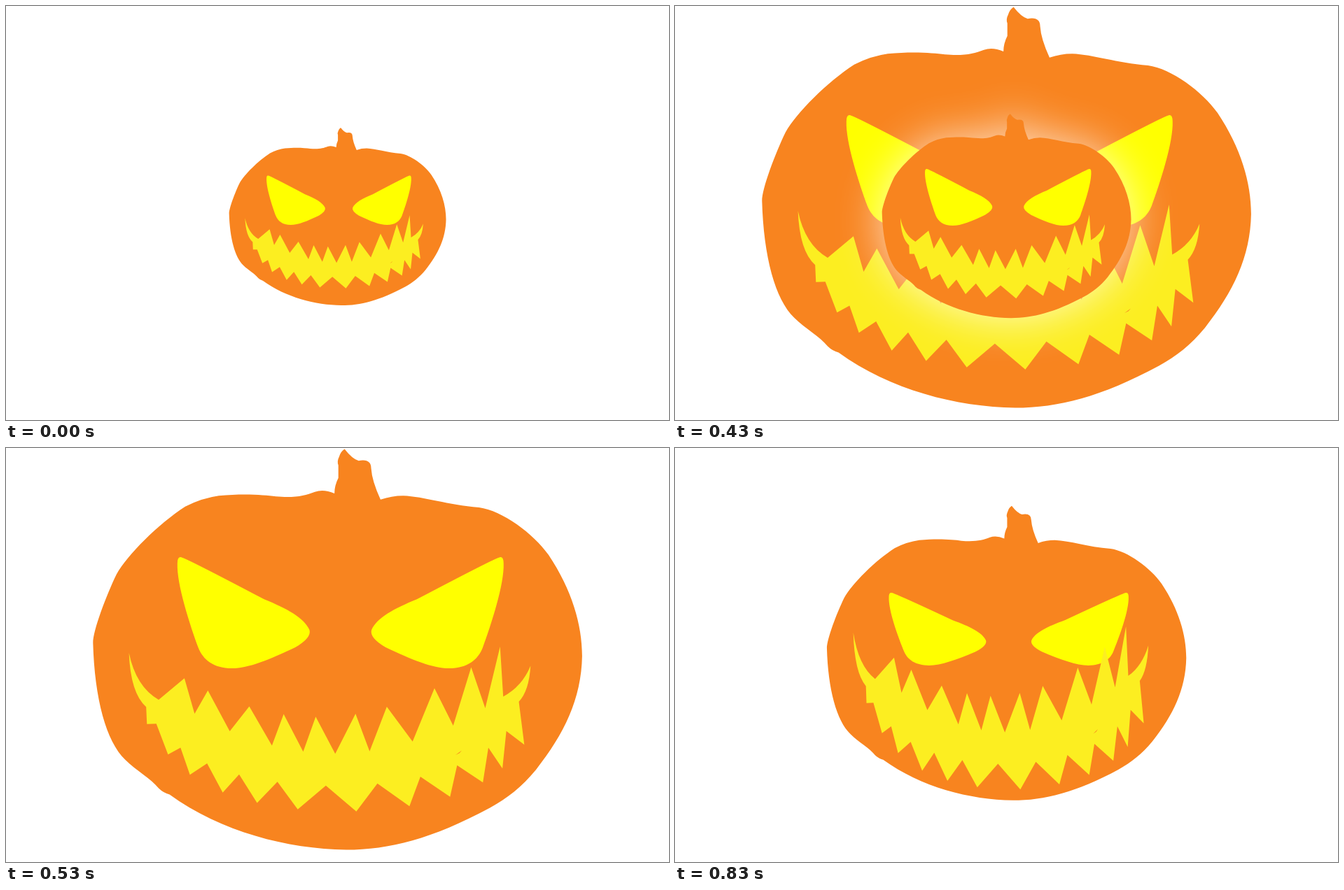
Write an HTML page with a canvas that moves like this. It is 947 by 592 pixels and loops after 900 ms.

```html
<!DOCTYPE html>
<html lang="en">
<head>
<meta charset="utf-8">
<title>Pumpkin</title>
<style>
  html, body { margin: 0; width: 100%; height: 100%; overflow: hidden; background: #fff; }
  canvas { display: block; }
</style>
</head>
<body>
<canvas id="stage" width="947" height="592"></canvas>
<script>
const ctx = document.getElementById('stage').getContext('2d');
const LOOP = 900;
const ORANGE = '#f8841f', YELLOW = '#fcee21', DARK = '#2e0a17', AMBER = '#fbb03b', BRIGHT = '#ffff00';
const MID_X = 479, MID_Y = 286.5, EYE_Y = 285, MOUTH_Y = 388;

// Stem, right side, underside, left side
const body = new Path2D(`M475 86 Q475 76 480 66 V50 Q478 45 481 39 Q483 32 488 29
  Q498 42 506 44 Q522 41 522 54 Q523 70 534 94
  Q548 89 563 89 C590 90 620 101 660 104 C690 108 730 138 749 165 C779 210 792 255 792 295
  C791 350 769 395 733 441 C715 463 696 478 674 490 C600 530 545 544 490 544
  C415 543 330 521 264 473 Q256 471 250 465 C240 452 222 443 207 428
  C183 405 168 350 166 278 C166 262 183 217 196 190 C210 165 250 125 284 103
  Q305 92 327 89 C360 86 385 88 400 90 C425 92 437 89 450 84 Q461 80 475 86Z`);

const eye = new Path2D(`M274 188 Q274 180 279 181 Q285 182 385 229 C415 240 436 250 443 264
  Q446 273 425 284 C392 298 365 308 344 308 C320 308 307 298 301 285 C290 258 273 212 274 188Z`);
const eyes = new Path2D(eye);
eyes.addPath(eye, new DOMMatrix([-1, 0, 0, 1, 965.5, 0]));

// Teeth alternate between tips and gaps; each row follows a sagging curve
const sag = d => .0011 * d ** 2 + 2.7e-13 * d ** 6;
const upperY = (x, i) => i % 2 ? 421 - .0019 * (x - 481) ** 2 : 364 - .002 * (x - 460) ** 2;
const lowerY = (x, i) => i % 2 ? 470 - sag(x - 480) : 510 - sag(x - 490);
const teeth = (xs, rule) => xs.map((x, i) => `L${x} ${rule(x, i)}`).join('');
const upper = [288, 301, 318, 346, 371, 400, 415, 440, 456, 481, 507, 525, 547, 580, 608, 632, 655, 673, 692, 696];
const lower = [723, 700, 695, 677, 670, 637, 628, 590, 576, 535, 508, 469, 433, 407, 381, 358, 337, 317, 295, 283, 267, 252, 240];
const mouth = new Path2D(`M217 266 Q226 318 255 338 ${teeth(upper, upperY)}
  Q720 318 731 286 Q729 325 716 341 ${teeth(lower, lowerY)} L239 349 Q219 328 217 266Z
  M635 423 L643 416 640 420Z`);

function fill(path, color) {
  ctx.fillStyle = color;
  ctx.fill(path, 'evenodd');
}

// Fills a shape stretched vertically about y, then shifted
function stretched(path, color, y, stretch, dx = 0, dy = 0) {
  ctx.save();
  ctx.translate(dx, y + dy);
  ctx.scale(1, stretch);
  ctx.translate(0, -y);
  fill(path, color);
  ctx.restore();
}

function pumpkin({ size, y, gape = .836, lean = 0, mouthColor = YELLOW, eyeColor = BRIGHT, glow = 0 }) {
  const fierce = gape >= 1;
  ctx.save();
  ctx.translate(473.6 + lean, y);
  ctx.scale(size, size * .997);
  ctx.translate(-MID_X, -MID_Y);
  ctx.shadowColor = 'rgba(255,255,255,.75)';
  ctx.shadowBlur = glow;
  fill(body, ORANGE);
  ctx.shadowBlur = 0;
  stretched(eyes, eyeColor, EYE_Y, fierce ? 1 : 1.125);
  stretched(mouth, mouthColor, MOUTH_Y, gape, lean - 5, fierce ? 0 : 5);
  ctx.restore();
}

const mix = (a, b, k) => a + (b - a) * k;
// 0, then one half from time a, then 1 from time b
const stairs = (t, a, b) => ((t >= a) + (t >= b)) / 2;

function draw(t) {
  if (t < 400) {
    pumpkin(t < 170 ? { size: .495, y: 301 } : { size: .518, y: 305 });
  } else if (t < 690) {
    pumpkin({ size: 1.116, y: 288 });
    if (t >= 530) return;
    const k = stairs(t, 430, 500);
    const colors = k === 1 ? { mouthColor: AMBER, eyeColor: AMBER } : {};
    pumpkin({ size: mix(.518, .619, k), y: mix(305, 295.5, k), glow: 64, ...colors });
  } else {
    const k = stairs(t, 760, 830);
    pumpkin({
      size: mix(1, .82, k), y: mix(286.5, 293.3, k), gape: mix(1, 1.125, k),
      lean: mix(5.4, 0, k), mouthColor: k < 1 ? DARK : YELLOW
    });
  }
}

const start = performance.now();
function frame() {
  ctx.fillStyle = '#fff';
  ctx.fillRect(0, 0, 947, 592);
  draw((performance.now() - start) % LOOP);
  requestAnimationFrame(frame);
}
frame();
</script>
</body>
</html>
```
